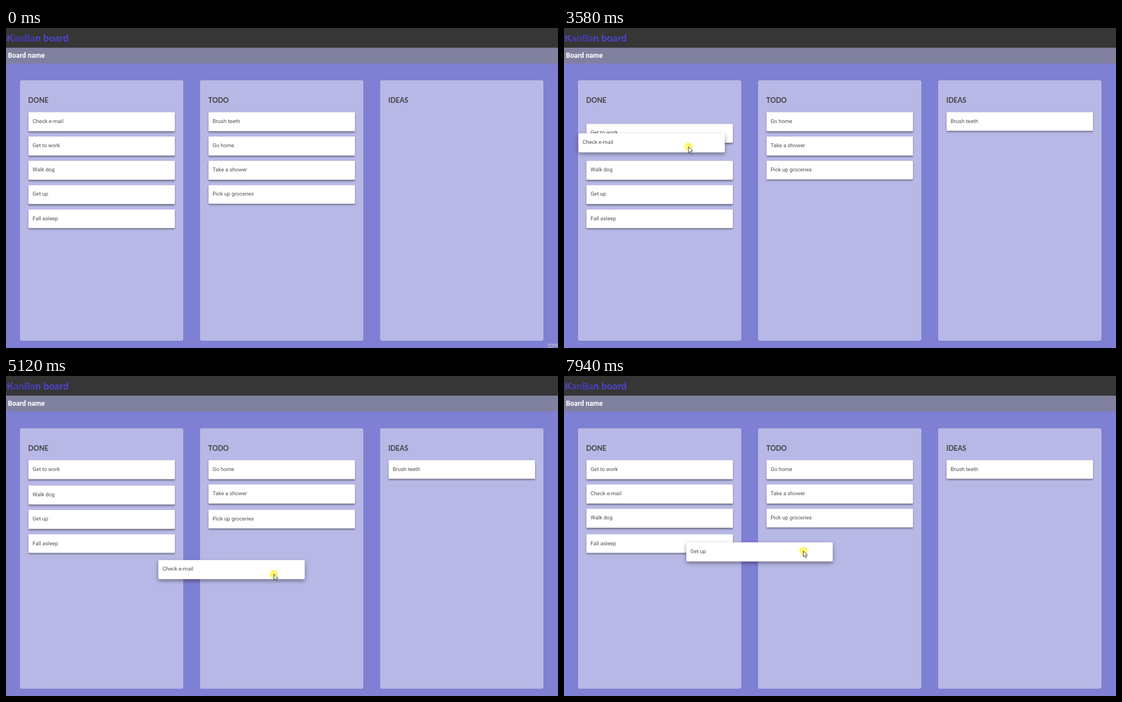
An HTML page that plays this animation: 984 by 569 pixels, repeating every 8000 ms.

```html
<!DOCTYPE html>
<html lang="en">
<head>
<meta charset="utf-8">
<title>KanBan board</title>
<style>
  html, body { margin: 0; width: 100%; height: 100%; overflow: hidden; }
  #stage {
    position: relative; width: 984px; height: 569px; overflow: hidden;
    background: #7f7fd3; font-family: Roboto, sans-serif;
  }
  #stage > * { position: absolute; }
  header {
    left: 0; top: 0; width: 984px; height: 35px; background: #363636;
    font: bold 17.6px/35px Lato, sans-serif; text-indent: 1.2px; color: #4f45d6;
  }
  header span { color: #463db4; }
  .bar {
    left: 0; top: 35px; width: 984px; height: 27.5px; background: #80809f;
    color: #fff; font-weight: bold; font-size: 12.1px; line-height: 28px; text-indent: 3.5px;
  }
  .column {
    top: 92.6px; width: 291px; height: 463px; border-radius: 3px; background: #b8b8e6;
  }
  .column h2 {
    margin: 28.4px 0 0 14.5px; font: bold 12.4px/16px Lato, sans-serif; color: #404040;
  }
  .card {
    left: 0; top: 0; width: 261px; height: 33px; box-sizing: border-box;
    padding-left: 7.3px; border-radius: 1.5px; background: #fff; color: #505050;
    font-size: 9.6px; line-height: 32px; white-space: nowrap;
    box-shadow: 0 2px 3px rgba(0, 0, 0, .42);
  }
  .card.lip { height: 34px; border-bottom: 1px solid #e2e2e6; }
  .card.ghost {
    border: 0; border-radius: 2.5px; z-index: 2;
    box-shadow: 0 3px 7px rgba(0, 0, 0, .42);
  }
  #tip {
    left: 966px; top: 561px; width: 18px; height: 8px; overflow: hidden;
    background: #9c9cdc; color: #63639c; font-size: 9px; line-height: 15px; text-indent: 3px;
  }
  #pointer { left: 0; top: 0; z-index: 3; overflow: visible; }
</style>
</head>
<body>
<div id="stage">
  <header>K<span>anBa</span>n board</header>
  <div class="bar">Board name</div>
  <div id="tip">Cards</div>
  <svg id="pointer" width="10" height="14">
    <circle r="7.5" fill="#ffee00" fill-opacity=".55"/>
    <path d="M0 0V10.6L2.4 8.4 4 12.2 5.8 11.4 4.2 7.7H7.6Z" fill="#fff" stroke="#333" stroke-width=".9"/>
  </svg>
</div>
<script>
const LOOP = 8000, SHIFT = 250, LAG = 18, STEP = 5;
const TOP = 149.7, PITCH = 43.25, WIDTH = 291;
const stage = document.getElementById('stage');
const tip = document.getElementById('tip');
const pointer = document.getElementById('pointer');
const halo = pointer.querySelector('circle');

const board = {
  DONE: ['Check e-mail', 'Get to work', 'Walk dog', 'Get up', 'Fall asleep'],
  TODO: ['Brush teeth', 'Go home', 'Take a shower', 'Pick up groceries'],
  IDEAS: []
};

// Pointer path: time, x, y
const path = [
  [390, 938, 548], [1130, 417, 168], [1410, 417, 168], [2190, 742, 208], [2270, 742, 208],
  [3240, 236.5, 170], [3330, 236.5, 170], [3580, 222, 211], [4110, 224, 338], [4210, 225, 330],
  [4640, 236, 176], [4760, 238, 176], [5120, 477, 352], [5350, 545, 368], [5680, 545, 392],
  [6150, 483, 293], [6260, 483, 293], [6560, 345, 273], [6700, 261, 240], [6950, 162, 208],
  [7080, 162, 208], [7430, 242.3, 294], [7540, 242.3, 294], [8010, 438, 312]
];

const grabs = [
  { text: 'Brush teeth', from: 1400, to: 2195 },
  { text: 'Check e-mail', from: 3270, to: 5800 },
  { text: 'Check e-mail', from: 6200, to: 7030 },
  { text: 'Get up', from: 7490, to: LOOP }
];

const clamp = (v, lo, hi) => Math.min(hi, Math.max(lo, v));
const colX = col => 25 + 321 * col;
const ease = p => 1 - Math.pow(1 - clamp(p, 0, 1), 2.2);
const grabAt = t => grabs.find(g => t >= g.from && t < g.to);

function add(className, html) {
  const el = document.createElement('div');
  el.className = className;
  el.innerHTML = html;
  stage.insertBefore(el, tip);
  return el;
}

Object.keys(board).forEach((name, col) => {
  add('column', `<h2>${name}</h2>`).style.left = colX(col) + 'px';
});
const lists = Object.values(board).map(list =>
  list.map(text => ({ text, el: add('card', text), moves: [] })));
const cards = lists.flat();

// Pointer speed at a path point, limited so that the curve never overshoots
function slope(i, k) {
  const rate = j => (path[j + 1][k] - path[j][k]) / (path[j + 1][0] - path[j][0]);
  if (i === 0 || i === path.length - 1) return 0;
  const a = rate(i - 1), b = rate(i);
  if (a * b <= 0) return 0;
  return Math.sign(a) * Math.min(Math.abs(a + b) / 2, 3 * Math.abs(a), 3 * Math.abs(b));
}

function cursor(t) {
  let i = 0;
  while (i < path.length - 2 && t >= path[i + 1][0]) i++;
  const a = path[i], b = path[i + 1], d = b[0] - a[0];
  const p = clamp((t - a[0]) / d, 0, 1), q = 1 - p;
  return [1, 2].map(k =>
    a[k] * (1 + 2 * p) * q * q + b[k] * p * p * (3 - 2 * p) +
    d * p * q * (slope(i, k) * q - slope(i + 1, k) * p));
}

function moveIndex(moves, t) {
  let i = moves.length - 1;
  while (i > 0 && t < moves[i].t) i--;
  return i;
}

// A card either follows the pointer or eases from its last place to its slot
function position(moves, t, i = moveIndex(moves, t)) {
  const m = moves[i];
  if (m.grip) return cursor(t - LAG).map((v, k) => v - m.grip[k]);
  const end = [colX(m.col) + 15, TOP + PITCH * m.slot];
  if (i === 0) return end;
  const p = ease((t - m.t) / SHIFT);
  return position(moves, m.t, i - 1).map((v, k) => v + (end[k] - v) * p);
}

function moveTo(card, t, col, slot, lip) {
  const m = card.moves.at(-1);
  if (!m || m.grip || m.col !== col || m.slot !== slot || m.lip !== lip) {
    card.moves.push({ t, col, slot, lip });
  }
}

// Play the drags once: the held card opens a gap in the list under the pointer
function rehearse() {
  let grab, held, col, slot;
  for (let t = 0; t < LOOP; t += STEP) {
    const now = grabAt(t);
    if (now !== grab) {
      if (held) lists[col].splice(slot, 0, held);
      held = now && cards.find(c => c.text === now.text);
      grab = now;
      if (held) {
        const home = position(held.moves, t), lip = held.moves.at(-1).lip;
        held.moves.push({ t, lip, grip: cursor(t).map((v, k) => v - home[k]) });
        const list = lists.find(l => l.includes(held));
        list.splice(list.indexOf(held), 1);
      }
    }
    if (held) {
      const x = cursor(t - LAG)[0], y = position(held.moves, t)[1];
      col = lists.findIndex((_, c) => x >= colX(c) && x <= colX(c) + WIDTH);
      slot = col < 0 ? 0 : clamp(Math.round((y - TOP) / PITCH), 0, lists[col].length);
    }
    lists.forEach((list, c) => list.forEach((card, i) => {
      const gap = held && c === col && i >= slot ? 1 : 0;
      moveTo(card, t, c, i + gap, i < list.length - 1);
    }));
  }
}

function place({ el, moves }, t) {
  const i = moveIndex(moves, t), m = moves[i];
  const [x, y] = position(moves, t, i);
  const settling = i > 0 && moves[i - 1].grip && t - m.t < SHIFT;
  el.style.transform = `translate(${x}px, ${y}px)`;
  el.className = 'card' + (m.lip ? ' lip' : '') + (m.grip || settling ? ' ghost' : '');
}

function draw() {
  const t = performance.now() % LOOP;
  const [x, y] = cursor(t);
  cards.forEach(card => place(card, t));
  tip.style.display = t < 70 ? '' : 'none';
  pointer.style.display = t < 390 ? 'none' : '';
  pointer.style.transform = `translate(${x}px, ${y}px)`;
  halo.style.display = grabAt(t) ? '' : 'none';
  requestAnimationFrame(draw);
}

rehearse();
draw();
</script>
</body>
</html>
```
